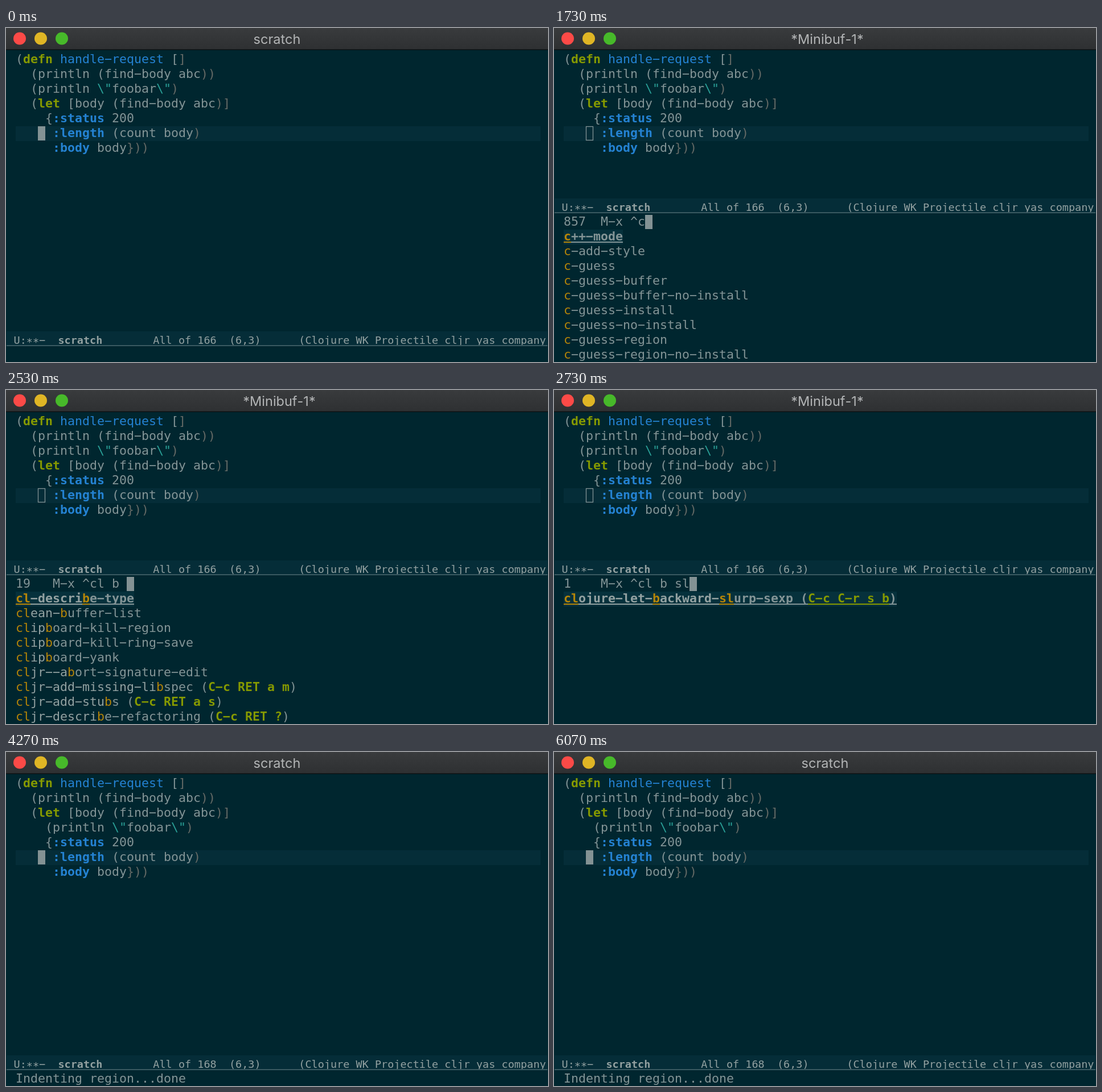
Animation of 952 by 588 pixels, one loop 6140 ms. Source, as an HTML page with a canvas:

```html
<!DOCTYPE html>
<html lang="en">
<head>
<meta charset="utf-8">
<title>Editor session</title>
<style>
  html, body { margin: 0; width: 100%; height: 100%; overflow: hidden; background: #00262f; }
  canvas { display: block; width: 952px; height: 588px; }
</style>
</head>
<body>
<canvas id="stage" width="952" height="588"></canvas>
<script>
const ctx = document.getElementById('stage').getContext('2d');
const LOOP = 6140;
const LEFT = 17, TOP = 43, ROW = 26, CELL = 13;
const MONO = '"DejaVu Sans Mono", monospace';
const C = {
  bg: '#00262f', line: '#052d38', pick: '#06313c', text: '#839496', light: '#93a1a1',
  dim: '#656a66', green: '#859900', blue: '#2482d2', cyan: '#2aa198', match: '#b58508',
  cursor: '#839294', rule: '#4c686f'
};

const BEFORE = [
  '(defn handle-request []',
  '  (println (find-body abc))',
  '  (println \\"foobar\\")',
  '  (let [body (find-body abc)]',
  '    {:status 200',
  '     :length (count body)',
  '     :body body}))'
];
const AFTER = BEFORE.slice();
AFTER[2] = BEFORE[3];
AFTER[3] = '  ' + BEFORE[2];

const ALL = [
  '2C-associate-buffer (C-x 6 b)', '2C-command (C-x 6)', '2C-split (C-x 6 s)',
  '2C-two-columns (C-x 6 2)', '5x5', '5x5-crack', '5x5-crack-mutating-best',
  '5x5-crack-mutating-current', '5x5-crack-randomly'
];
const WITH_C = ['c++-mode', 'c-add-style'].concat(
  ['', '-buffer', '-buffer-no-install', '-install', '-no-install', '-region', '-region-no-install']
    .map(s => 'c-guess' + s));
const WITH_CL = [
  'cl-describe-type', 'clean-buffer-list', 'clean-mode', 'clear-font-cache',
  'clear-rectangle (C-x r c)', 'clipboard-kill-region', 'clipboard-kill-ring-save',
  'clipboard-yank', 'cljr--abort-signature-edit'
];
const WITH_B = [
  'cl-describe-type', 'clean-buffer-list', 'clipboard-kill-region', 'clipboard-kill-ring-save',
  'clipboard-yank', 'cljr--abort-signature-edit', 'cljr-add-missing-libspec (C-c RET a m)',
  'cljr-add-stubs (C-c RET a s)', 'cljr-describe-refactoring (C-c RET ?)'
];
const SLURP = 'clojure-let-backward-slurp-sexp (C-c C-r s b)';
const WITH_S = [
  'clean-buffer-list', 'clipboard-kill-ring-save', 'cljr--abort-signature-edit',
  'cljr-add-missing-libspec (C-c RET a m)', 'cljr-add-stubs (C-c RET a s)',
  'cljr-remove-debug-fns (C-c RET r d)', SLURP
];

// start time, typed query, match count, visible candidates
const PROMPTS = [
  [1270, '', 8412, ALL],
  [1730, 'c', 857, WITH_C],
  [1870, 'cl', 187, WITH_CL],
  [2070, 'cl ', 187, WITH_CL],
  [2270, 'cl b', 19, WITH_B],
  [2470, 'cl b ', 19, WITH_B],
  [2600, 'cl b s', 7, WITH_S],
  [2730, 'cl b sl', 1, [SLURP]]
];
const DONE = 4200;

function box(x, y, w, h, color) {
  ctx.fillStyle = color;
  ctx.fillRect(x, y, w, h);
}

// Text on a fixed character grid, with wide hyphens and low asterisks.
function cells(str, x, y, color, bold, size = 21.6, pitch = CELL) {
  ctx.font = `${bold ? 'bold ' : ''}${size}px ${MONO}`;
  ctx.fillStyle = color;
  const glyphs = str.replace(/-/g, '\u2212').replace(/\*/g, '\u2217');
  [...glyphs].forEach((g, i) => {
    if (g !== ' ') ctx.fillText(g, x + i * pitch, y);
  });
}

const rowTop = row => TOP + row * ROW;
const colX = col => LEFT + col * CELL;

function put(str, row, col, color = C.text, bold = false) {
  cells(str, colX(col), rowTop(row) + 19, color, bold);
}

function codeLine(str, row) {
  const token = /(\bdefn\b|\blet\b)|(handle-request)|(:\w+)|(\\")|([)\]}])/g;
  let at = 0;
  for (const m of str.matchAll(token)) {
    put(str.slice(at, m.index), row, at);
    const color = m[1] ? C.green : m[2] || m[3] ? C.blue : m[4] ? C.cyan : C.dim;
    put(m[0], row, m.index, color, Boolean(m[1] || m[3]));
    at = m.index + m[0].length;
  }
  put(str.slice(at), row, at);
}

function candidate(str, row, words, picked) {
  const open = str.indexOf(' (');
  const nameEnd = open < 0 ? str.length : open;
  const hits = new Set();
  let end = 0;
  for (const word of words) {
    const i = str.indexOf(word, end);
    end = i + word.length;
    for (let k = i; k < end; k++) hits.add(k);
  }
  if (picked) box(LEFT, rowTop(row), str.length * CELL, ROW, C.pick);
  [...str].forEach((g, i) => {
    const key = i > nameEnd + 1 && i < str.length - 1;
    const color = key ? C.green : hits.has(i) ? C.match : i < end ? C.light : C.text;
    put(g, row, i, color, picked || key);
    if (picked) box(colX(i), rowTop(row) + 21, CELL, 2, color);
  });
}

function modeLine(y, size) {
  const parts = [[0, 'U:**-'], [7, 'scratch'], [22, `All of ${size}`], [34, '(6,3)'],
    [45, '(Clojure WK Projectile cljr yas company']];
  box(1, y, 950, 26, C.line);
  ctx.save();
  ctx.beginPath();
  ctx.rect(1, y, 950, 24);
  ctx.clip();
  for (const [col, str] of parts) {
    cells(str, 13.5 + col * 11.13, y + 22, C.light, str === 'scratch', 18.5, 11.13);
  }
  ctx.restore();
  box(1, y + 24.5, 950, 1.5, C.rule);
}

// Letters are set one by one so that the font does not lower the asterisks.
function titleText(title, center) {
  ctx.font = '23.5px Inter, sans-serif';
  ctx.fillStyle = '#b3b5b6';
  const widths = [...title].map(g => ctx.measureText(g).width);
  let x = center - widths.reduce((a, b) => a + b) / 2;
  [...title].forEach((g, i) => {
    ctx.fillText(g, x, 27.5);
    x += widths[i];
  });
}

function titleBar(title, center) {
  const shade = ctx.createLinearGradient(0, 0, 0, 38);
  shade.addColorStop(0, '#393b3d');
  shade.addColorStop(1, '#2e3032');
  box(0, 0, 952, 38, shade);
  box(0, 37.5, 952, 1.5, '#0a1113');
  ['#fc4a47', '#dfb525', '#47b92a'].forEach((color, i) => {
    ctx.fillStyle = color;
    ctx.beginPath();
    ctx.arc(24 + 37 * i, 18.5, 11, 0, 7);
    ctx.fill();
  });
  titleText(title, center);
}

function miniBuffer([, query, count, list]) {
  const line = `${String(count).padEnd(4)} M-x ^${query}`;
  put(line, 11, 0);
  box(colX(line.length), rowTop(11), CELL, 25, C.cursor);
  const words = query.split(' ').filter(Boolean);
  list.forEach((str, i) => candidate(str, 12 + i, words, i === 0));
}

function draw(t) {
  const done = t >= DONE;
  const prompt = done ? undefined : PROMPTS.filter(p => t >= p[0]).pop();
  box(0, 0, 952, 588, C.bg);
  titleBar(prompt ? '*Minibuf-1*' : 'scratch', prompt ? 480 : 476);
  box(LEFT, rowTop(5), 922, ROW, C.line);
  (done ? AFTER : BEFORE).forEach(codeLine);
  if (prompt) {
    ctx.strokeStyle = C.cursor;
    ctx.lineWidth = 1.3;
    ctx.strokeRect(56.5, 173.5, 12, 24);
  } else {
    box(56, 173, CELL, 25, C.cursor);
  }
  modeLine(prompt ? 300 : 534, done ? 168 : 166);
  if (prompt) miniBuffer(prompt);
  if (done) put('Indenting region...done', 20, 0);
}

const start = performance.now();
function tick() {
  draw((performance.now() - start) % LOOP);
  requestAnimationFrame(tick);
}
tick();
</script>
</body>
</html>
```
